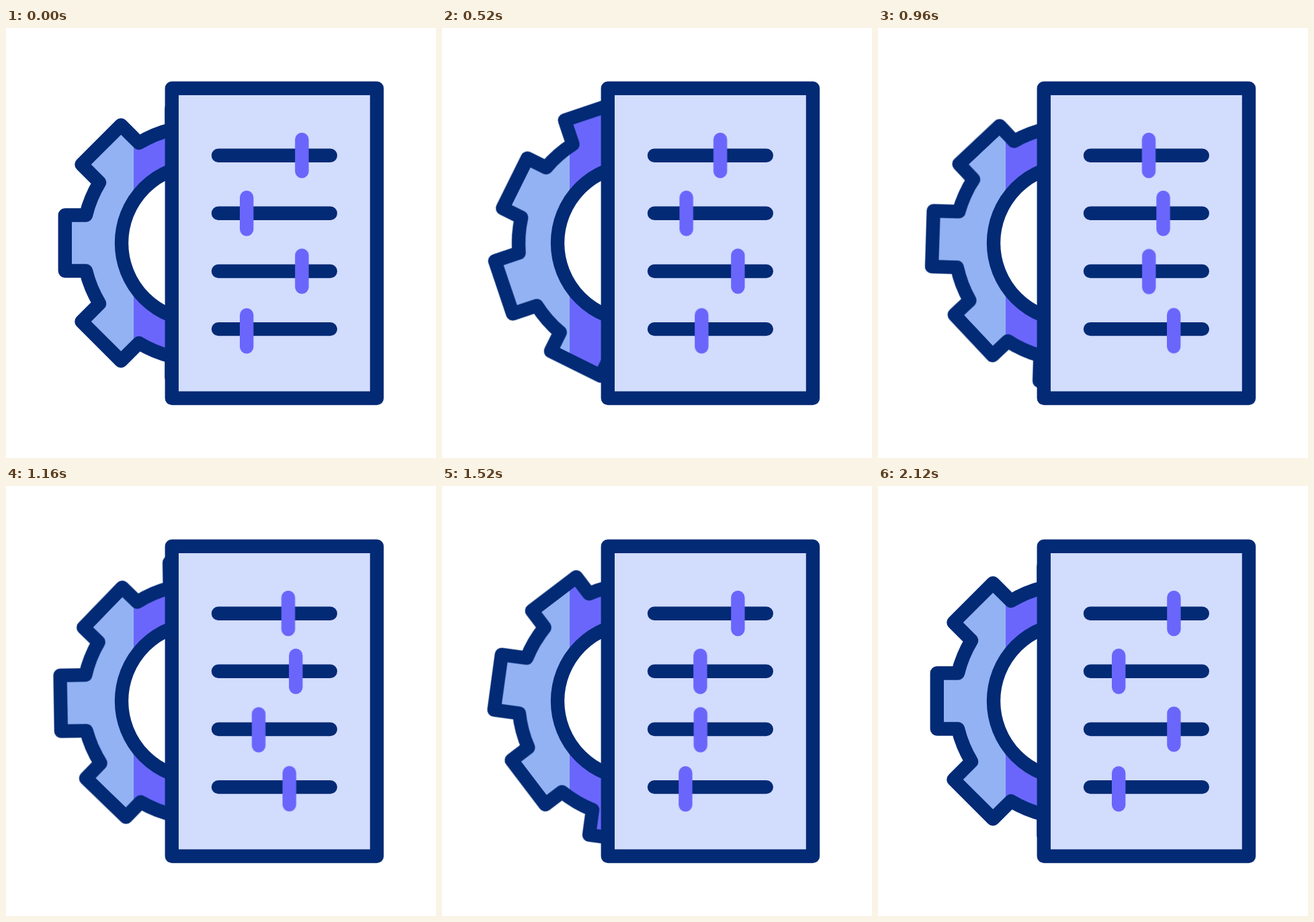
Recreate the animation shown at these times as an HTML page. Size 640x640 px, loop 2.16 s.

```html
<!DOCTYPE html>
<html lang="en">
<head>
<meta charset="utf-8">
<title>Settings panel</title>
<style>
  html, body { margin: 0; width: 100%; height: 100%; overflow: hidden; background: #fff; }
  svg { display: block; width: 100%; height: 100%; }
  .line { fill: none; stroke: #032a75; stroke-width: 20.4; stroke-linecap: round; stroke-linejoin: round; }
  .knob { stroke: #6a66fb; stroke-width: 20.4; stroke-linecap: round; animation: 2160ms cubic-bezier(.333, 0, .667, 1) infinite; }
  .gear { transform-origin: 288px 320px; animation: spin 2160ms cubic-bezier(.622, 0, .378, 1) infinite; }
  .k1 { animation-name: slide1; }
  .k2 { animation-name: slide2; }
  .k3 { animation-name: slide3; }
  .k4 { animation-name: slide4; }

  @keyframes spin {
    0% { transform: rotate(0deg); }
    98.148%, 100% { transform: rotate(360deg); }
  }
  @keyframes slide1 {
    0%, 5.37%, 68.84%, 100% { transform: translate(0, 0); }
    37.78% { transform: translate(-42.5px, 0); }
  }
  @keyframes slide2 {
    0%, 18.75%, 83.24%, 100% { transform: translate(0, 0); }
    51.16% { transform: translate(74.5px, 0); }
  }
  @keyframes slide3 {
    0%, 27.45%, 89.07%, 100% { transform: translate(0, 0); }
    61.44% { transform: translate(-74px, 1px); }
  }
  @keyframes slide4 {
    0%, 10.83%, 74.54%, 100% { transform: translate(0, 0); }
    44.54% { transform: translate(82px, -.4px); }
  }
</style>
</head>
<body>
<svg viewBox="0 0 640 640">
  <defs>
    <path id="gear"/>
    <clipPath id="shade"><rect x="190.6" y="0" width="200" height="640"/></clipPath>
  </defs>

  <use class="gear" href="#gear" fill="#93b2f3"/>
  <g clip-path="url(#shade)"><use class="gear" href="#gear" fill="#6a66fb"/></g>
  <use class="gear line" href="#gear"/>
  <circle class="line" cx="288" cy="320" r="116" style="fill:#fff"/>

  <rect class="line" x="246.8" y="89.8" width="305.2" height="461.2" style="fill:#d2dcfd"/>
  <path class="line" d="M316 189.8H482.8M316 275.8H482.8M316 362H482.8M316 448.1H482.8"/>

  <path class="knob k1" d="M440.4 166V213.4"/>
  <path class="knob k2" d="M358.2 252.2V299.6"/>
  <path class="knob k3" d="M440.4 338.4V385.6"/>
  <path class="knob k4" d="M358.2 427.2V474.6"/>
</svg>
<script>
  // Eight teeth; the diagonal ones reach slightly further out.
  const ROOT = 169, HALF = 41.5, ARC = 174;

  function point(out, side, angle) {
    const c = Math.cos(angle), s = Math.sin(angle);
    const x = 288 - out * c - side * s;
    const y = 320 - out * s + side * c;
    return x.toFixed(2) + ' ' + y.toFixed(2);
  }

  let d = '';
  for (let i = 0; i < 8; i++) {
    const a = i * Math.PI / 4, tip = i % 2 ? 206.8 : 200.2;
    d += (i ? `A${ARC} ${ARC} 0 0 1 ` : 'M') + point(ROOT, HALF, a);
    d += 'L' + [point(tip, HALF, a), point(tip, -HALF, a), point(ROOT, -HALF, a)].join('L');
  }
  d += `A${ARC} ${ARC} 0 0 1 ${point(ROOT, HALF, 0)}Z`;
  document.getElementById('gear').setAttribute('d', d);
</script>
</body>
</html>
```
